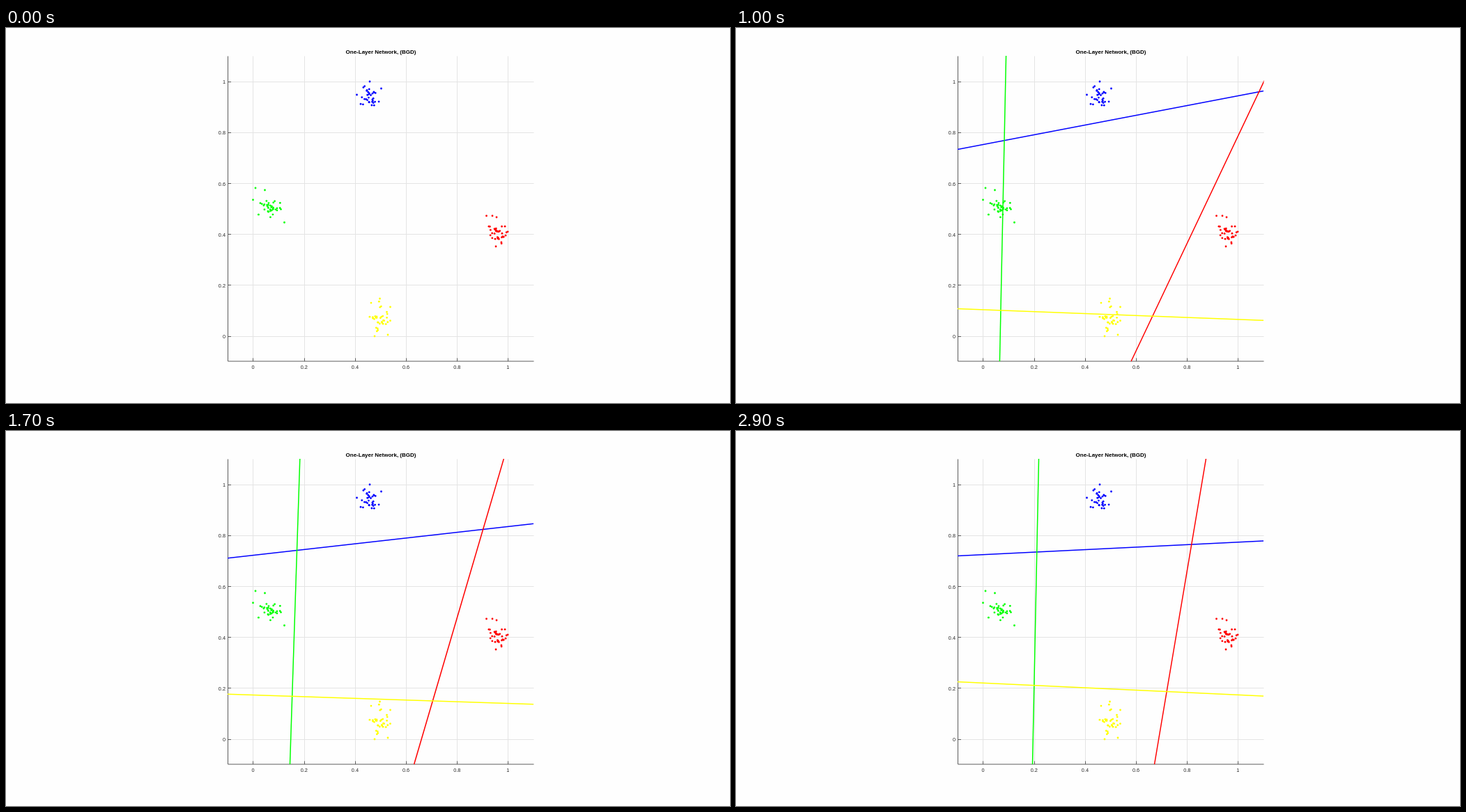
Write an HTML page with a canvas that moves like this. It is 1039 by 539 pixels and loops after 3000 ms.

```html
<!DOCTYPE html>
<html lang="en">
<head>
<meta charset="utf-8">
<title>One-Layer Network</title>
<style>
html, body { margin: 0; width: 100%; height: 100%; overflow: hidden; background: #fefefe; }
canvas { display: block; }
</style>
</head>
<body>
<canvas id="stage" width="1039" height="539"></canvas>
<script>
const ctx = document.getElementById('stage').getContext('2d');
const LOOP = 3000, STEP = 100, DOTS = 33;
const BOX = { l: 318.5, r: 757.5, t: 40.5, b: 479 };
const FONT = '"Liberation Sans", Arial, sans-serif';
const INK = '#262626', AXIS = '#5c5c5c', GRID = '#e4e4e4';
const px = v => 354.9 + 365.8 * v;
const py = v => 443.1 - 365.8 * v;

// from, to: where the boundary meets two opposite sides of the box,
// as [limit, rate, bend] of a quadratic in the decaying step size.
const classes = [
  {
    color: '#0000ff', center: [522, 99], reach: [14, 17],
    outliers: [[522, 77], [503.5, 96], [538.5, 87]],
    from: [161.5, 79.15, -73.7], to: [191.9, -95.6, -24.2]
  },
  {
    color: '#ff0000', center: [705, 295], reach: [18, 18], upright: true,
    outliers: [[689.5, 270], [698, 270], [704, 272], [703, 314]],
    from: [612.2, 191.5, -4.8], to: [627.9, -91.7, 25]
  },
  {
    color: '#00ff00', center: [379, 258], reach: [20, 16], upright: true,
    outliers: [[358, 230], [371.5, 233], [354.5, 247], [399.5, 279.5]],
    from: [439.6, 11.2, -81.7], to: [452.1, -78.9, -6.7]
  },
  {
    color: '#ffff00', center: [536, 417], reach: [16, 26],
    outliers: [[536.5, 389], [551.5, 401], [548, 441], [529, 443]],
    from: [331, 94, -12.3], to: [371.3, 13.1, 49.6]
  }
];

function seeded(seed) {
  return () => (seed = (seed * 16807) % 2147483647) / 2147483647;
}

const random = seeded(20177);
const spread = () => random() + random() - 1;

for (const c of classes) {
  c.dots = [...c.outliers];
  for (let i = 0; i < DOTS; i++) {
    c.dots.push(c.center.map((v, axis) => v + spread() * c.reach[axis]));
  }
}

function stroke(x1, y1, x2, y2, color, width = 1) {
  ctx.strokeStyle = color;
  ctx.lineWidth = width;
  ctx.beginPath();
  ctx.moveTo(x1, y1);
  ctx.lineTo(x2, y2);
  ctx.stroke();
}

function label(text, x, y, align, font, color) {
  ctx.font = font + ' ' + FONT;
  ctx.textAlign = align;
  ctx.fillStyle = color;
  ctx.fillText(text, x, y);
}

function drawAxes() {
  const snap = v => Math.floor(v) + 0.5;
  const ticks = Array.from({ length: 6 }, (_, i) => i / 5);
  for (const v of ticks) {
    stroke(snap(px(v)), BOX.t, snap(px(v)), BOX.b, GRID);
    stroke(BOX.l, snap(py(v)), BOX.r, snap(py(v)), GRID);
  }
  for (const v of ticks) {
    const x = snap(px(v)), y = snap(py(v));
    stroke(x, BOX.b, x, BOX.b - 4.5, AXIS);
    stroke(BOX.l, y, BOX.l + 4.5, y, AXIS);
    label(String(v), px(v) - 0.3, 490, 'center', '7.3px', INK);
    label(String(v), 315, py(v) + 3, 'right', '7.3px', INK);
  }
  stroke(BOX.l, BOX.t, BOX.l, BOX.b, AXIS);
  stroke(BOX.l, BOX.b, BOX.r, BOX.b, AXIS);
  label('One-Layer Network, (BGD)', 538, 36.6, 'center', 'bold 8px', '#000');
}

function drawDots({ dots, color }) {
  ctx.fillStyle = color;
  for (const [x, y] of dots) {
    ctx.beginPath();
    ctx.arc(x, y, 1.4, 0, 2 * Math.PI);
    ctx.fill();
  }
}

function drawBoundary({ from, to, color, upright }, u) {
  const at = ([limit, rate, bend]) => limit + rate * u + bend * u * u;
  if (upright) stroke(at(from), 40, at(to), 479, color, 1.5);
  else stroke(318, at(from), 757, at(to), color, 1.5);
}

function draw(time) {
  const t = Math.floor((time % LOOP) / STEP) * STEP;
  ctx.fillStyle = '#fefefe';
  ctx.fillRect(0, 0, 1039, 539);
  drawAxes();
  classes.forEach(drawDots);
  if (t === 0) return;
  ctx.save();
  ctx.beginPath();
  ctx.rect(318, 40, 439.5, 439.5);
  ctx.clip();
  classes.forEach(c => drawBoundary(c, 1000 / (t + 150)));
  ctx.restore();
}

const start = performance.now();
function tick() {
  draw(performance.now() - start);
  requestAnimationFrame(tick);
}
tick();
</script>
</body>
</html>
```
